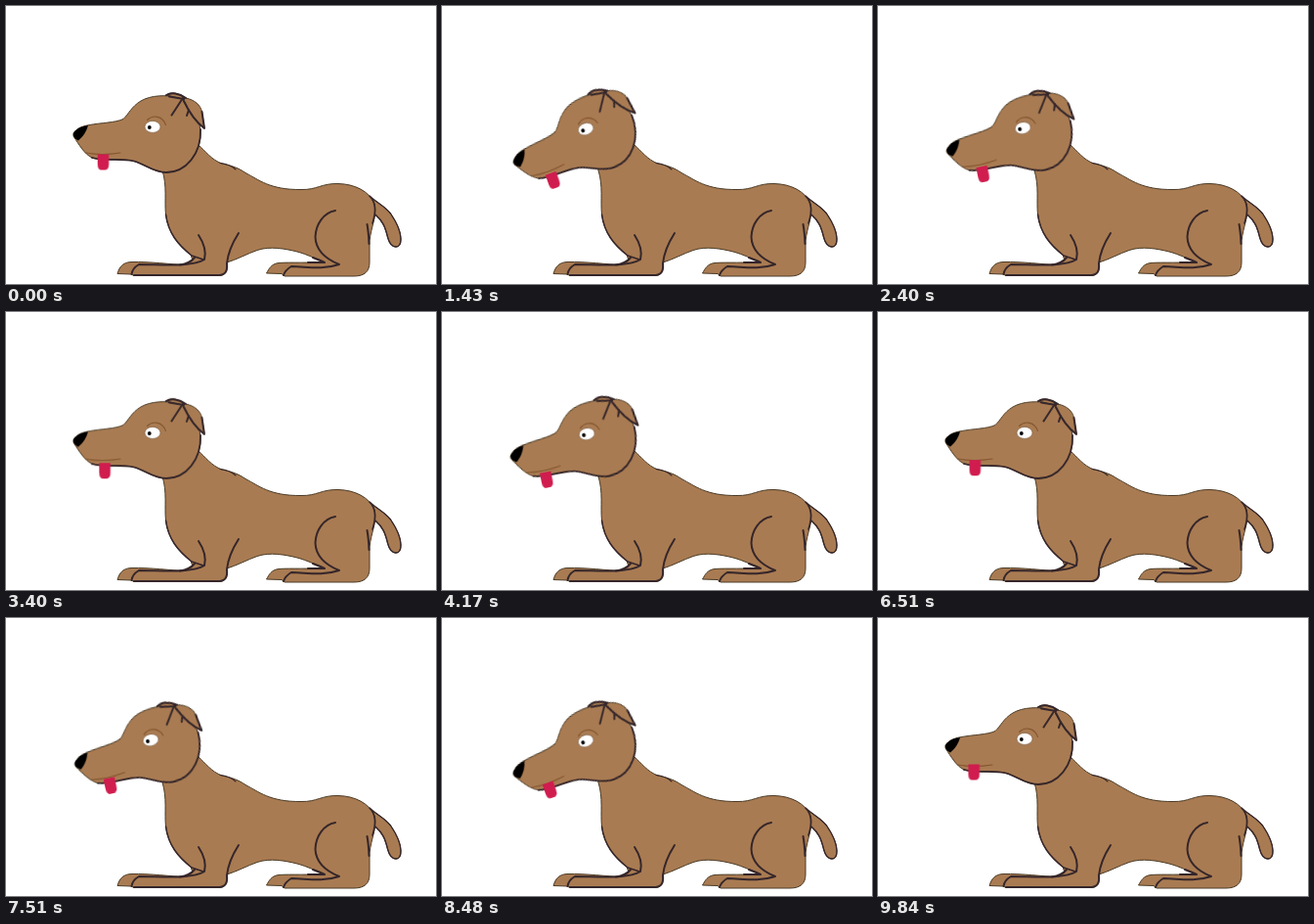
These frames come from a looping animation (440x284 px, 9870 ms). An HTML page:

```html
<!DOCTYPE html>
<html lang="en">
<head>
<meta charset="utf-8">
<title>Dog</title>
<style>
  html, body { margin: 0; width: 100%; height: 100%; overflow: hidden; background: #fff; }
  svg { display: block; width: 440px; height: 284px; }
  .fur { fill: #a97b52; stroke: #4a3b26; stroke-width: 1; stroke-linejoin: round; }
  .line { fill: none; stroke: #35262a; stroke-width: 2; stroke-linecap: round; stroke-linejoin: round; }
  .thin { fill: none; stroke: #85562f; stroke-width: 1.1; stroke-linecap: round; }
  .head { transform-origin: 155px 133px; animation: nod 1645ms cubic-bezier(.37, 0, .63, 1) infinite alternate; }
  .tongue { fill: #d01c4e; animation: pant 98.7ms -49.35ms cubic-bezier(.37, 0, .63, 1) infinite alternate; }
  @keyframes nod { to { transform: rotate(-20.4deg); } }
  @keyframes pant {
    from { transform: translate(-.9px, -2px); }
    to { transform: translate(2.3px, 3px); }
  }
</style>
</head>
<body>
<svg viewBox="0 0 440 284">
  <g class="tail">
    <path class="fur" d="M371 194C380 201 388 205 393.500 212C399 220 404 230 404 238C404 244 402 246 399 246C395 246 392 242 390.500 236C388 226 385 219 376 212Z"/>
    <path class="line" d="M373 195C380 201 388 205 393.500 212C399 220 404 230 404 238C404 244 402 246 399 246C395 246 392 242 390.500 236C388 226 386 220 378 213" style="stroke-width:1.3"/>
  </g>

  <g class="body">
    <path class="fur" d="M160 168C165 184 162 199 163.500 213C166 232 176 244 189 254
      L191 260L184 264.500C168 264 148 261 128 261.500C119 262 116 267 114 273.500
      L128 274L131 275.500H219C225 275 226 271 226 262
      C236 259 247 253 257 249.500C270 245 286 248 298 251C309 254 316 258 325 261
      C310 263 292 261.500 279 262.500C271 263.500 269 269 266.500 273L282 273.500L285 276H356
      C367 276 372 271 372 262V240C374 224 379 217 377.500 203
      C372 189 357 182 340 181.500C323 181 318 188 302 187.500C270 188 258 177 246 171
      C237 165 232 163.500 221 161C210 157 204 148 197 142L180 130H155Z"/>
    <path class="line" d="M163.500 213C166 232 176 244 190 255L202 259" style="stroke-width:1.5"/>
    <path class="line" d="M197 234C203 243 205 251 203 259C190 267 160 264 136 264C131 267 129 270 128.500 274"/>
    <path class="line" d="M178 264.500Q188 263 193 257"/>
    <path class="line" d="M238 232C231 243 227 253 226 263C227 272 224 275 216 275H131"/>
    <path class="line" d="M337 209C325 211 317 223 316.500 236C317 249 326 258 341 264C323 270 307 266 292 266C287 269 285 272 284 275"/>
    <path class="line" d="M314 257Q322 260 326 262H309"/>
    <path class="line" d="M369.500 223Q371 231 371.500 243"/>
    <path class="line" d="M372 194C379 201 379 210 375 222" style="stroke-width:1.6"/>
    <path class="line" d="M219 160.500Q229 161.500 235 167" style="stroke-width:1.1"/>
  </g>

  <g class="head">
    <path class="fur" d="M69 130C72 125.500 77 123 84 121.800C98 119 111 119.500 120 115.500
      C126 110 128 103 138 97C148 91 164 90.500 178 93.500C193 101 199 115 199 132
      C198 154 182 170 164 170C151 170 143 162 131 158.500C117 155 100 159 88 155
      C80 151 75 142 69 133Z"/>
    <path class="line" d="M199 126C200 151 184 170 164 170C151 170 143 162 131 158.500C117 155 100 159 88 155" style="stroke-width:1.8"/>
    <path d="M68.800 131C70 126.500 76 123 84 122C82 129 79 133 74 137.500C71 136 69 134 68.800 131Z"/>
    <path class="thin" d="M82 150Q98 153 117 150"/>
    <path class="tongue" d="M93 151H104.500V161Q104.500 167 100 167H97Q93 167 93 161Z"/>

    <path class="thin" d="M144.500 116.500C150.500 110.500 160.500 112.500 163.500 121.500"/>
    <ellipse cx="150" cy="123.400" rx="8" ry="6" fill="#fff" stroke="#806248" stroke-width=".7"/>
    <circle cx="146.800" cy="124" r="1.900"/>

    <path class="fur" d="M164 91C169 87 177 89 184 94C193 96 199 101 200.500 108L203 125C195 119 188 108 180 95Z"/>
    <path class="line" d="M164 91C169 88 177 89 184 94M167 92.500L182 95M181 94L169.500 111.500M182 97C188 110 195 119 203 125L200.500 108M187 106L185 112"/>
  </g>
</svg>
</body>
</html>
```
